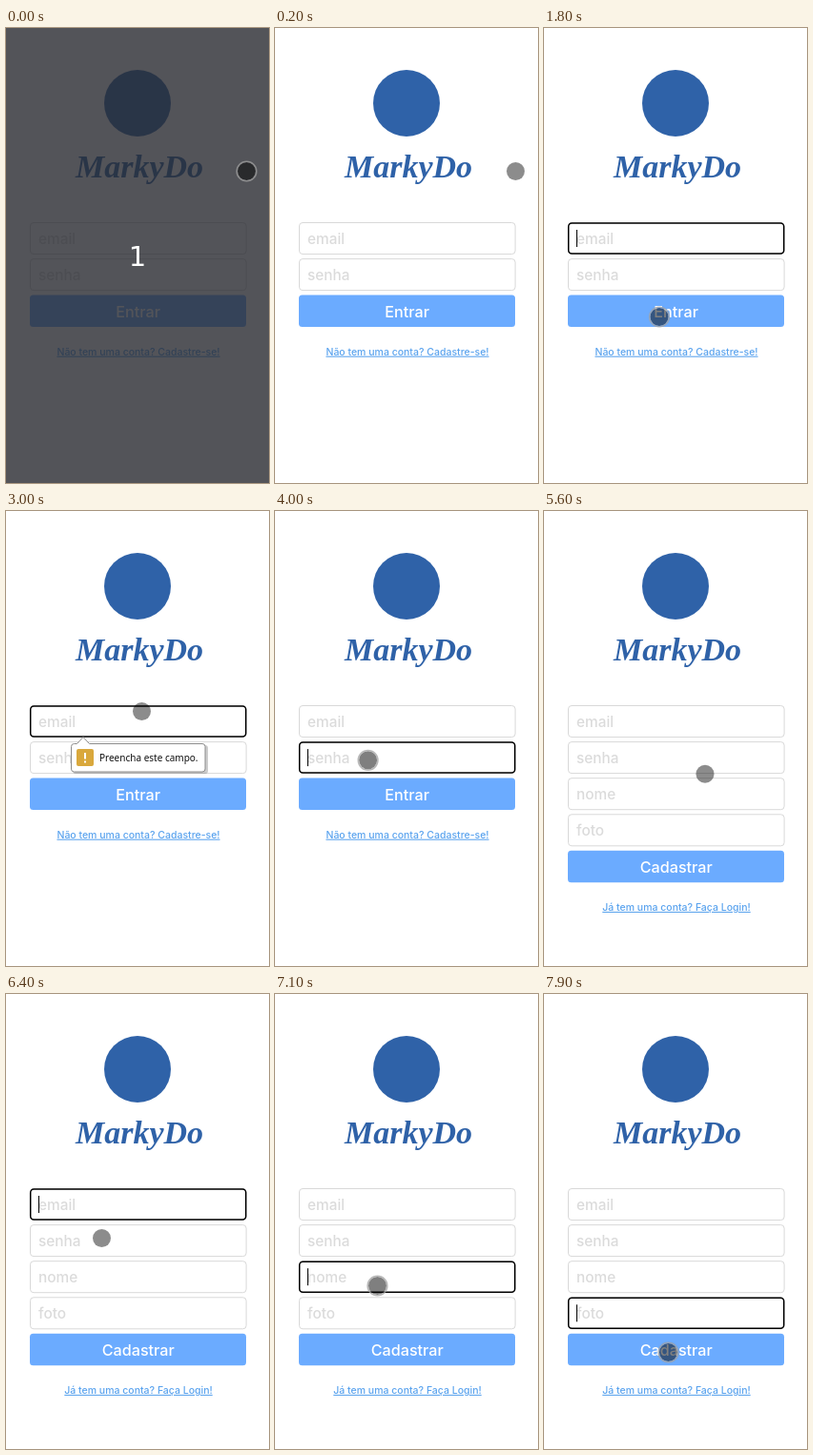
An HTML page for the animation above (8000 ms loop, 276 px wide and 478 px high).

```html
<!DOCTYPE html>
<html lang="pt">
<head>
<meta charset="utf-8">
<title>Login</title>
<style>
  html, body { margin: 0; width: 100%; height: 100%; overflow: hidden; background: #fff; }
  svg { display: block; width: 100%; height: 100%; }
  text { font-family: Inter, sans-serif; font-weight: 500; }
  .brand { font: italic bold 34px "Liberation Serif", serif; fill: #2f62a8; }
  .box { fill: #fff; stroke: #d9d9d9; }
  .hint { font-size: 15.4px; fill: #dbdbdb; }
  .button { fill: #6babff; }
  .label { font-size: 16.2px; fill: #fff; }
  .link { font-size: 10.5px; fill: #5aa3ee; text-decoration: underline 0.8px; text-underline-offset: 1px; }
  .tip { font: 10px "Noto Sans", sans-serif; fill: #111; }
  .count { font: 29px "DejaVu Sans", sans-serif; fill: #fff; }
  .mid { text-anchor: middle; }
</style>
</head>
<body>
<svg viewBox="0 0 276 478" preserveAspectRatio="none">
  <rect width="276" height="478" fill="#fff"/>
  <circle cx="138" cy="79" r="35" fill="#2f62a8"/>
  <text class="brand mid" x="140" y="157">MarkyDo</text>

  <g id="fields"></g>
  <g id="login"></g>
  <g id="signup"></g>

  <rect id="focus" x="25.7" width="226" height="32" rx="3.5" fill="none" stroke="#000" stroke-width="1.5"/>
  <rect id="caret" x="34" width="1" height="18" fill="#000"/>

  <g id="tip">
    <rect x="70" y="246" width="142" height="30" rx="3" fill="#000" opacity=".2"/>
    <path d="M71.5 244.5H74.5L81 237.5L87.5 244.5H206Q209 244.5 209 247.5V271Q209 274 206 274H71.5Q68.5 274 68.5 271V247.5Q68.5 244.5 71.5 244.5Z" fill="#fff" stroke="#8c8c8c"/>
    <rect x="74" y="250" width="18" height="18" rx="2" fill="#d9a83c"/>
    <path d="M83 254V260.5M83 262.5V264.5" stroke="#fff" stroke-width="2"/>
    <text class="tip" x="98" y="263">Preencha este campo.</text>
  </g>

  <g id="shade">
    <rect width="276" height="478" fill="#292a30" opacity=".8"/>
    <text class="count mid" x="138" y="250">1</text>
  </g>
  <g id="cursor">
    <circle id="dot" r="9.5" fill="#000"/>
    <circle id="ring" r="10.3" fill="none" stroke="#a0a0a0" stroke-opacity=".75" stroke-width="1.6"/>
  </g>
</svg>
<script>
const LOOP = 8000, STEP = 100, BLINK = 900, PRESS = 200;
const SIGNUP_AT = 5200;
const $ = id => document.getElementById(id);
const show = (el, on) => el.setAttribute("display", on ? "inline" : "none");
const rowTop = i => 204.5 + 38.1 * i;

function addForm(id, row, label, link) {
  const y = rowTop(row);
  $(id).innerHTML = `<rect class="button" x="25" y="${y - 0.2}" width="227" height="33.5" rx="3.5"/>
    <text class="label mid" x="138.7" y="${y + 23.2}">${label}</text>
    <text class="link mid" x="139" y="${y + 63}">${link}</text>`;
}
addForm("login", 2, "Entrar", "Não tem uma conta? Cadastre-se!");
addForm("signup", 4, "Cadastrar", "Já tem uma conta? Faça Login!");

const fields = ["email", "senha", "nome", "foto"].map((name, i) => {
  const g = document.createElementNS("http://www.w3.org/2000/svg", "g");
  g.innerHTML = `<rect class="box" x="25.5" y="${rowTop(i)}" width="226.6" height="33" rx="3.5"/>
    <text class="hint" x="34" y="${rowTop(i) + 22.4}">${name}</text>`;
  $("fields").append(g);
  return g;
});

// Pointer strokes: each one continues from the end of the last, optionally bent towards a point.
const strokes = [];
let pen = { x: 252, y: 150 };
function stroke(from, to, x, y, bend) {
  const a = pen, b = { x, y };
  const c = bend || { x: (a.x + x) / 2, y: (a.y + y) / 2 };
  strokes.push({ from, to, a, b, c });
  pen = b;
}
stroke(300, 700, 122, 227, { x: 50, y: 330 });
stroke(800, 1100, 101, 225, { x: 75, y: 212 });
stroke(1400, 1800, 120.5, 303);
stroke(2000, 2100, 162, 284);
stroke(2200, 3000, 142, 210);
stroke(3000, 3700, 78, 238, { x: 125, y: 180 });
stroke(3800, 4700, 164, 343);
stroke(4700, 4800, 157, 343);
stroke(5300, 5900, 87, 220, { x: 215, y: 270 });
stroke(6000, 6400, 100, 256);
stroke(6500, 7100, 107, 306, { x: 98, y: 335 });
stroke(7200, 7900, 130, 376);

function cursorAt(t) {
  const { from, to, a, b, c } = strokes.filter(s => s.from <= t).pop() || strokes[0];
  const k = Math.min(1, Math.max(0, (t - from) / (to - from)));
  const bezier = axis => (1 - k) ** 2 * a[axis] + 2 * k * (1 - k) * c[axis] + k * k * b[axis];
  return [bezier("x") + 0.5, bezier("y") + 0.5];
}

// A click on a field moves the focus; one without a field keeps it.
const clicks = [
  { at: 0 }, { at: 1300, field: 0 }, { at: 1800 }, { at: 3900, field: 1 },
  { at: SIGNUP_AT, field: -1 }, { at: 6100, field: 0 }, { at: 6700, field: 1 },
  { at: 7000, field: 2 }, { at: 7500, field: 3 }, { at: 7900 }
];

function draw(time) {
  const t = Math.floor((time % LOOP) / STEP) * STEP;
  const signup = t >= SIGNUP_AT;
  show($("login"), !signup);
  show($("signup"), signup);
  fields.forEach((f, i) => show(f, i < 2 || signup));

  const past = clicks.filter(c => c.at <= t);
  const { at, field } = past.filter(c => "field" in c).pop() || { at: 0, field: -1 };
  show($("focus"), field >= 0);
  show($("caret"), field >= 0 && (t - at) % (2 * BLINK) < BLINK);
  $("focus").setAttribute("y", rowTop(field) + 0.5);
  $("caret").setAttribute("y", rowTop(field) + 7.5);

  show($("tip"), t >= 2300 && t < 3900);
  show($("shade"), t < 200);

  const pressed = t - past.pop().at < PRESS;
  $("cursor").setAttribute("transform", `translate(${cursorAt(t)})`);
  $("dot").setAttribute("opacity", pressed ? 0.5 : 0.45);
  show($("ring"), pressed);
}

const start = performance.now();
function tick() {
  draw(performance.now() - start);
  requestAnimationFrame(tick);
}
tick();
</script>
</body>
</html>
```
